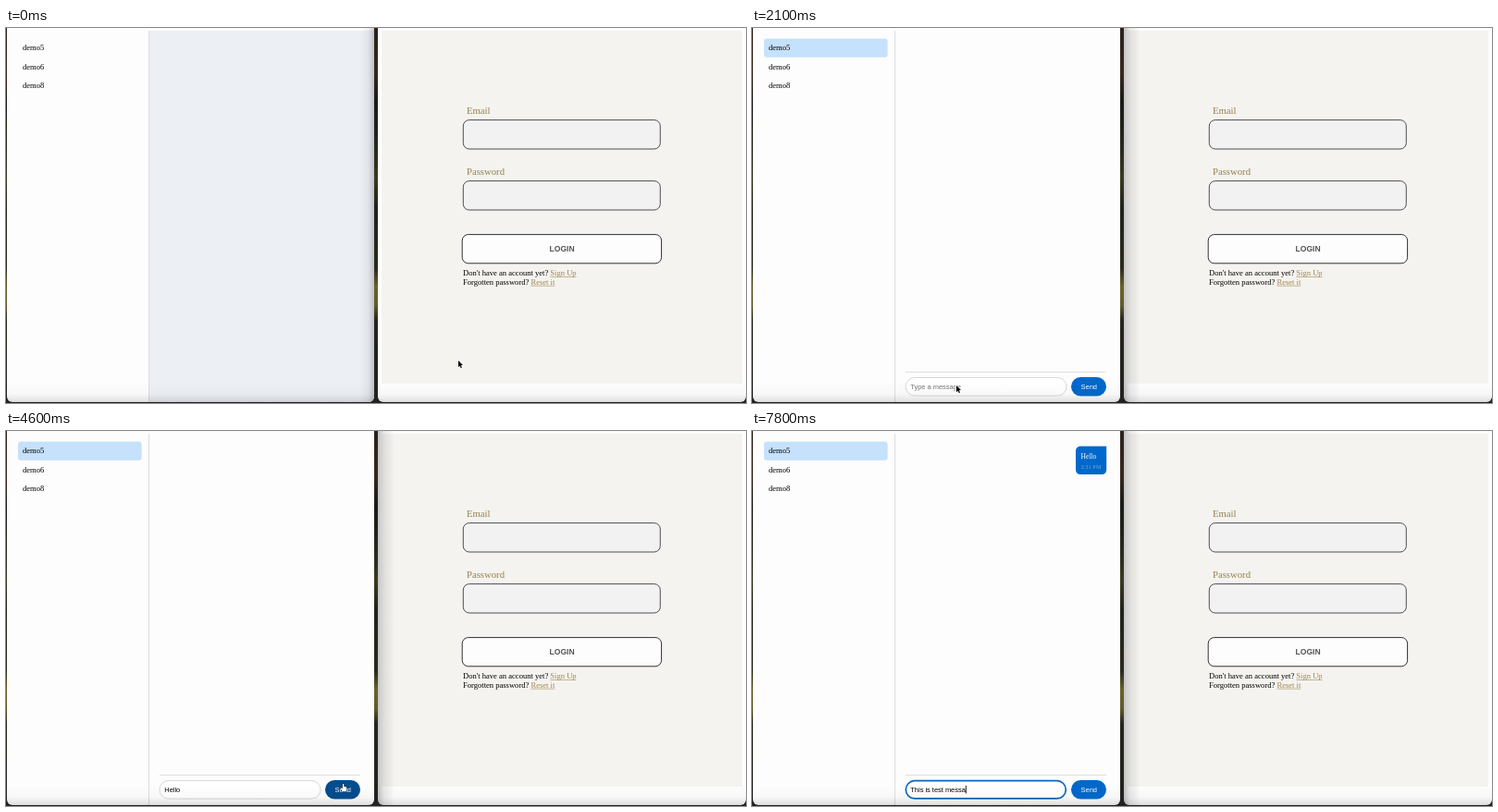
Recreate the animation shown at these times as an HTML page with a canvas. Size 800 by 406 pixels, loop 8 s.

```html
<!DOCTYPE html>
<html lang="en">
<head>
<meta charset="utf-8">
<title>Chat and login windows</title>
<style>
html, body { margin: 0; width: 100%; height: 100%; overflow: hidden; background: #1d1c19; }
canvas { display: block; width: 800px; height: 406px; }
</style>
</head>
<body>
<canvas id="stage"></canvas>
<script>
const W = 800, H = 406, LOOP = 8000, STEP = 100;
const SERIF = '"Liberation Serif", serif';
const SANS = '"Liberation Sans", sans-serif';
const BLUE = '#0068cb';
const ROWS = ['demo5', 'demo6', 'demo8'];

const canvas = document.getElementById('stage');
const ctx = canvas.getContext('2d');
const dpr = window.devicePixelRatio || 1;
canvas.width = W * dpr;
canvas.height = H * dpr;

// Moments when the state of the chat changes
const AT = { raise: 800, select: 1000, focus: 2300, press: 4500, sent: 4700, refocus: 5200 };

const HELLO = { text: 'Hello', times: [3200, 3300, 3400, 3500, 3600] };
const SECOND = {
  text: 'This is test messa',
  times: [5500, 5600, 5700, 5800, 5800, 5900, 6000, 6200, 6200, 6300, 6500,
    6600, 6700, 6900, 7100, 7400, 7600, 7800]
};

// Pointer stops: time, x, y
const PATH = [
  [0, 489, 360], [100, 489, 360], [700, 21, 23], [1400, 21, 23],
  [2100, 221, 387], [3700, 221, 387], [4000, 285, 394], [4400, 364, 382],
  [4800, 364, 382], [5200, 247, 390], [5500, 247, 390]
];

const ease = p => p * p * (3 - 2 * p);
const typed = (line, t) => line.text.slice(0, line.times.filter(k => k <= t).length);

function pointerAt(t) {
  let i = 0;
  while (i < PATH.length - 2 && PATH[i + 1][0] <= t) i++;
  const [t0, x0, y0] = PATH[i], [t1, x1, y1] = PATH[i + 1];
  const p = ease(Math.min(1, (t - t0) / (t1 - t0)));
  return { x: x0 + (x1 - x0) * p, y: y0 + (y1 - y0) * p };
}

function rect(x, y, w, h, fill) {
  ctx.fillStyle = fill;
  ctx.fillRect(x, y, w, h);
}

function box(x, y, w, h, r, fill, stroke, line = 1) {
  ctx.beginPath();
  ctx.roundRect(x, y, w, h, r);
  if (fill) {
    ctx.fillStyle = fill;
    ctx.fill();
  }
  if (stroke) {
    ctx.strokeStyle = stroke;
    ctx.lineWidth = line;
    ctx.stroke();
  }
}

function text(str, x, y, size, color, family = SERIF, weight = '400') {
  ctx.font = `${weight} ${size}px ${family}`;
  ctx.fillStyle = color;
  ctx.fillText(str, x, y);
  return ctx.measureText(str).width;
}

function fade(x0, y0, x1, y1, stops) {
  const g = ctx.createLinearGradient(x0, y0, x1, y1);
  stops.forEach(([p, c]) => g.addColorStop(p, c));
  return g;
}

function bottomShade(x, w) {
  rect(x, 384, w, 21, fade(0, 384, 0, 405,
    [[0, 'rgba(0,0,0,0)'], [0.6, 'rgba(0,0,0,.025)'], [1, 'rgba(0,0,0,.12)']]));
}

function inWindow(x, w, draw) {
  ctx.save();
  ctx.beginPath();
  ctx.roundRect(x, -10, w, 415, 6);
  ctx.clip();
  rect(x, 0, w, H, '#fdfdfd');
  draw();
  bottomShade(x, w);
  ctx.restore();
}

function wallpaper() {
  rect(0, 0, W, H, fade(0, 0, 0, H, [
    [0, '#2b211b'], [0.12, '#37291c'], [0.2, '#191b18'], [0.33, '#292b1d'],
    [0.4, '#3a3b20'], [0.48, '#20231a'], [0.64, '#292b1b'], [0.69, '#6a6329'],
    [0.74, '#625b2b'], [0.78, '#25251d'], [1, '#222220']
  ]));
}

function sidebar(selected, over) {
  ROWS.forEach((name, i) => {
    const y = 11.4 + i * 20.6;
    const fill = over === i ? '#dcdcdc' : selected && i === 0 ? '#c5e1fc' : null;
    if (fill) box(13, y, 133.6, 20.4, 3, fill);
    text(name, 18, y + 12.8, 8.5, '#000');
  });
}

function composer(value, focused, caret, pressed) {
  rect(166, 372, 217, 1, '#dedede');
  if (focused) box(166.3, 378.7, 173, 19.2, 9.6, '#fff', '#0b66bd', 1.7);
  else box(166, 378.5, 174, 19.6, 9.8, '#fff', '#cfcfcf', 0.8);
  const w = text(value || 'Type a message', 171.3, 390.8, 7.45, value ? '#000' : '#757575', SANS);
  if (caret) rect(171.3 + (value ? w : 0), 384, 0.9, 8.5, '#000');
  box(345, 378, 38, 20.4, 10.2, pressed ? '#044c8d' : BLUE);
  text('Send', 355.6, 390.8, 7.45, '#fff', SANS);
}

function bubble() {
  box(350, 16.5, 33.2, 30.6, [5, 0, 5, 5], BLUE);
  text('Hello', 355.4, 30, 7.6, '#fff');
  text('2:31 PM', 355.4, 40.6, 6.4, '#79a5d0');
}

function chat(t, pointer) {
  const selected = t >= AT.select;
  const inRow = pointer.x > 13 && pointer.x < 147 && pointer.y > 11 && pointer.y < 73;
  const over = inRow ? Math.floor((pointer.y - 11.4) / 20.6) : -1;
  if (!selected) rect(155, 3, 243, 402, '#eceff4');
  rect(154, 3, 1, 402, '#dcdde0');
  sidebar(selected, over);
  if (!selected) return;

  const focused = (t >= AT.focus && t < AT.press) || t >= AT.refocus;
  const value = t < AT.sent ? typed(HELLO, t) : typed(SECOND, t);
  const blinkFrom = t < AT.refocus ? AT.focus : AT.refocus;
  const typing = value && t >= AT.refocus;
  const caret = focused && (typing || (t - blinkFrom) % 1000 < 500);
  const hover = pointer.x > 345 && pointer.x < 383 && pointer.y > 378 && t > 4000 && t < 5000;
  composer(value, focused, caret, hover);
  if (t >= AT.sent) bubble();
}

function link(label, x, y) {
  const w = text(label, x, y, 8.55, '#a08650');
  rect(x, y + 1, w, 0.6, '#a08650');
}

function field(label, y) {
  text(label, 498, y - 6.6, 10.7, '#94804f');
  box(494.3, y, 213, 31.4, 6.5, '#f2f2f3', '#3c3c40', 0.9);
}

function login() {
  rect(406, 3, 390, 382, '#f4f3ef');
  field('Email', 99.6);
  field('Password', 165.6);
  box(493.2, 223.6, 215.4, 31.2, 6.5, '#fdfdfd', '#303034', 1);
  text('LOGIN', 587.6, 242.4, 8.55, '#555', SANS, '700');
  const a = text("Don't have an account yet? ", 494, 268.3, 8.55, '#000');
  link('Sign Up', 494 + a, 268.3);
  const b = text('Forgotten password? ', 494, 277.8, 8.55, '#000');
  link('Reset it', 494 + b, 277.8);
}

function shape(points, x, y, fill) {
  ctx.beginPath();
  points.forEach(([dx, dy]) => ctx.lineTo(x + dx, y + dy));
  ctx.closePath();
  ctx.lineJoin = 'round';
  ctx.strokeStyle = fill === '#000' ? '#fff' : '#000';
  ctx.lineWidth = fill === '#000' ? 1.2 : 0.8;
  ctx.stroke();
  ctx.fillStyle = fill;
  ctx.fill();
}

const ARROW = [[0, 0], [0, 7.2], [1.6, 5.8], [2.7, 8.2], [3.9, 7.7], [2.8, 5.3], [5, 5.1]];
const HAND = [[0, 0], [1.2, 0], [1.5, 3], [4.3, 3.6], [4.4, 6.2], [3.4, 8.2],
  [-0.4, 8.2], [-2.5, 5.1], [-1.8, 4.3], [-0.3, 5.2]];

function drawPointer(t, { x, y }) {
  if ((t >= 3200 && t < 3800) || t >= 5500) return;
  const hand = (t < 2000 ? false : x > 345 && x < 383 && y > 378);
  if (hand) shape(HAND, x, y, '#fff');
  else shape(ARROW, x, y, '#000');
}

function draw(t) {
  const pointer = pointerAt(t);
  const front = t >= AT.raise;
  ctx.setTransform(dpr, 0, 0, dpr, 0, 0);
  wallpaper();
  inWindow(1, 397, () => {
    chat(t, pointer);
    if (!front) rect(382, 0, 16, H, fade(382, 0, 398, 0,
      [[0, 'rgba(0,0,0,0)'], [0.6, 'rgba(0,0,0,.05)'], [1, 'rgba(0,0,0,.2)']]));
  });
  inWindow(402, 398, () => {
    login();
    if (front) rect(402, 0, 18, H, fade(402, 0, 420, 0,
      [[0, 'rgba(0,0,0,.24)'], [0.35, 'rgba(0,0,0,.09)'], [1, 'rgba(0,0,0,0)']]));
  });
  drawPointer(t, pointer);
}

const start = performance.now();
function tick() {
  const t = (performance.now() - start) % LOOP;
  draw(Math.floor(t / STEP) * STEP);
  requestAnimationFrame(tick);
}
tick();
</script>
</body>
</html>
```
